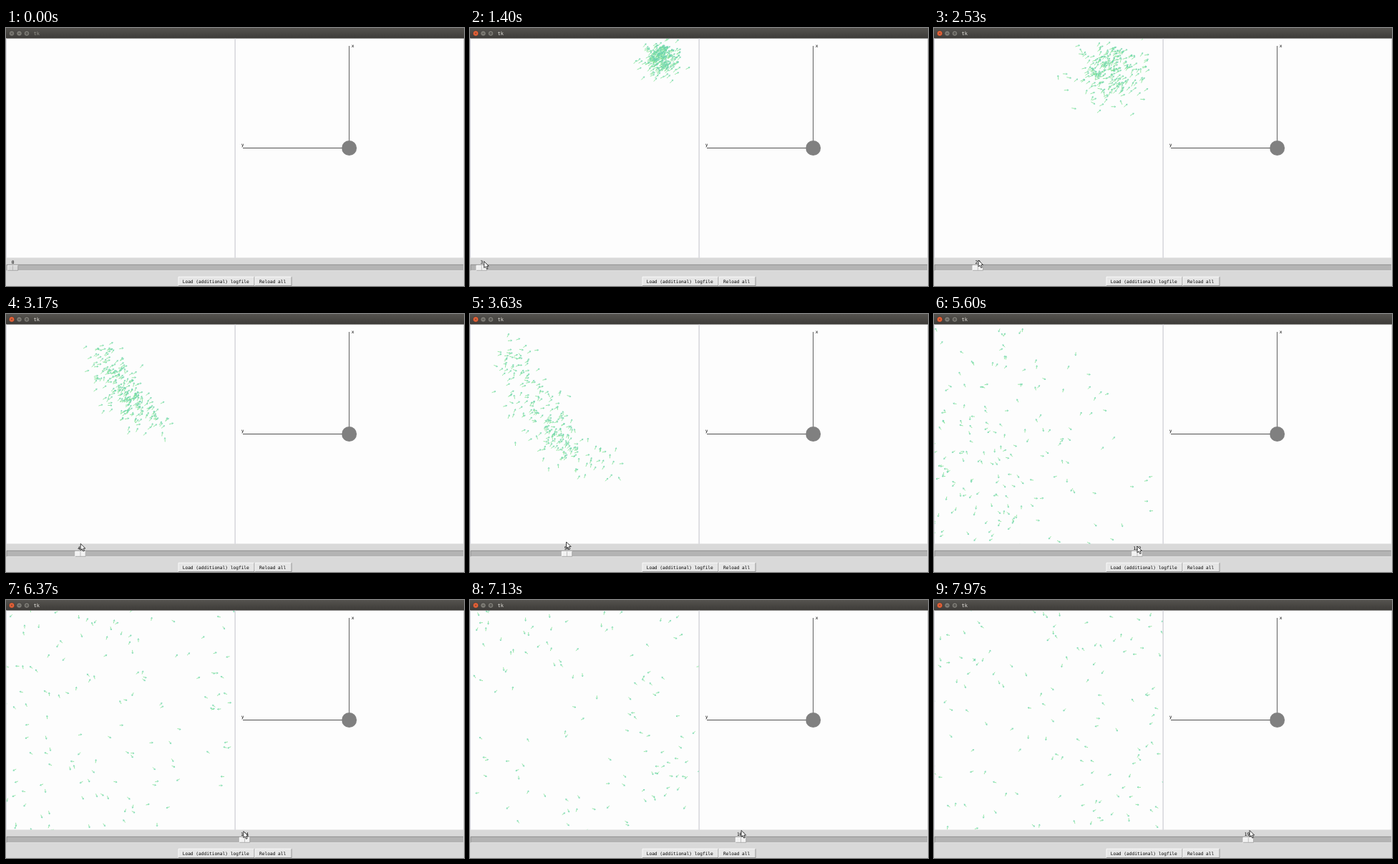
Animation of 640x360 px, one loop 8 s. Source, as an HTML page:

```html
<!DOCTYPE html>
<html lang="en">
<head>
<meta charset="utf-8">
<title>tk</title>
<style>
html, body { margin: 0; width: 100%; height: 100%; overflow: hidden; background: #d9d9d9; }
svg { display: block; width: 640px; height: 360px; }
text { font: 6.2px "DejaVu Sans Mono", monospace; fill: #000; }
</style>
</head>
<body>
<svg viewBox="0 0 640 360">
  <defs>
    <linearGradient id="bar" x2="0" y2="1">
      <stop offset="0" stop-color="#55534f"/>
      <stop offset="1" stop-color="#3d3b38"/>
    </linearGradient>
    <clipPath id="view"><rect x="1" y="15" width="318.5" height="305.5"/></clipPath>
  </defs>
  <rect width="640" height="360" fill="#d9d9d9"/>
  <rect width="640" height="14.5" fill="url(#bar)"/>
  <g fill="#7b7973" stroke="#33322f" stroke-width=".6">
    <circle id="close" cx="8" cy="7.5" r="3.8"/>
    <circle cx="18.5" cy="7.5" r="3.8"/>
    <circle cx="29" cy="7.5" r="3.8"/>
    <path d="M6.8 6.3l2.4 2.4m0-2.4l-2.4 2.4M17.3 7.5h2.4M28 6.5h2v2h-2z" fill="none"/>
  </g>
  <text id="title" x="38.5" y="10" style="font-size:7px">tk</text>

  <rect x="1" y="15" width="318.5" height="305.5" fill="#fdfdfd"/>
  <rect x="321" y="15" width="318" height="305.5" fill="#fdfdfd"/>
  <path d="M320.2 14.5V321M.5 14.5V321" stroke="#dadae2" fill="none"/>
  <g clip-path="url(#view)" fill="none">
    <path id="shafts" stroke="#74e08a" stroke-width=".75"/>
    <path id="heads" stroke="#6fd3b4" stroke-width=".7"/>
  </g>

  <path d="M479.5 25V158" stroke="#606060"/>
  <path d="M331 167.5H470" stroke="#505050"/>
  <circle cx="479.6" cy="167.5" r="10.5" fill="#808080"/>
  <text x="482.8" y="27">x</text>
  <text x="328.8" y="165">y</text>

  <rect x="1" y="330" width="638" height="8.5" fill="#b3b3b3"/>
  <path d="M1 338.5V330.3H639" stroke="#828282" stroke-width=".7" fill="none"/>
  <path d="M1 338.7H639" stroke="#f0f0f0" stroke-width=".6"/>
  <g id="thumb">
    <rect id="knob" y="331" width="15" height="7.5"/>
    <path d="M.3 338.3V331.3H15" stroke="#fff" stroke-width=".7" fill="none"/>
    <path d="M.3 338.3H14.7V331.3" stroke="#828282" stroke-width=".6" fill="none"/>
    <path d="M7.5 331.6V338" stroke="#a8a8a8" stroke-width=".7"/>
  </g>
  <text id="value" y="328.5" text-anchor="middle">0</text>

  <g id="buttons"></g>
  <text x="246.7" y="355.8">Load (additional) logfile</text>
  <text x="354" y="355.8">Reload all</text>
  <path id="cursor" d="M0 0V9L2.1 7.2 3.7 10.6 5.3 9.9 3.8 6.6H6.6Z" fill="#fff" stroke="#222" stroke-width=".9"/>
</svg>
<script>
const LOOP = 8000, FOCUS = 100, PRESS = 970, COUNT = 240, SCATTER = 89;
const $ = id => document.getElementById(id);
const mix = (a, b, k) => a + (b - a) * k;

// Linear interpolation through rows of [position, value, value, ...].
function along(rows, p) {
  if (p <= rows[0][0]) return rows[0].slice(1);
  for (let i = 1; i < rows.length; i++) {
    const a = rows[i - 1], b = rows[i];
    if (p <= b[0]) {
      const k = (p - a[0]) / (b[0] - a[0]);
      return a.slice(1).map((v, j) => mix(v, b[j + 1], k));
    }
  }
  return rows[rows.length - 1].slice(1);
}

const drag = [[1130, 0], [1970, 10], [2530, 23], [3630, 56], [4530, 89], [5600, 122],
  [6100, 137], [6930, 160], [7130, 164.5], [7770, 186], [7970, 191.4], [8000, 192.3]];
const pointer = [[300, 60, 364], [PRESS, 9.5, 326], [1130, 9.5, 326], [2530, 62, 324],
  [3630, 134.5, 318], [4530, 209, 319], [5600, 284, 324], [7130, 379, 321.5],
  [7970, 441, 321.5], [8000, 443, 321.5]];
const band = [[0, 62, 10], [.25, 66, 75], [.5, 100, 150], [.75, 150, 203], [1, 270, 240]];

// Seeded mulberry32 generator
let seed = 7;
function rnd() {
  seed = (seed + 0x6D2B79F5) | 0;
  let t = Math.imul(seed ^ (seed >>> 15), 1 | seed);
  t = (t + Math.imul(t ^ (t >>> 7), 61 | t)) ^ t;
  return ((t ^ (t >>> 14)) >>> 0) / 4294967296;
}
const gauss = () => Math.sqrt(-2 * Math.log(1 - rnd())) * Math.cos(2 * Math.PI * rnd());

function makeParticle() {
  const u = mix(rnd(), (rnd() + rnd()) / 2, .4);
  const [bx, by] = along(band, u);
  const gx = gauss(), gy = gauss();
  return {
    path: [
      [0, 270 + gx * 10, 40 + gy * 10, -.7 + gauss() * .2],
      [23, 247 + gx * 24, 60 + gy * 22, -.65 + gauss() * .45],
      [56, bx + gauss() * 17, by + gauss() * 16, mix(-.1, -1.3, u) + gauss() * .5],
      [SCATTER, bx * 1.1 - 15 + gauss() * 52, by * .9 + 68 + gauss() * 52, rnd() * 2 * Math.PI]
    ],
    speed: 2 + rnd() * 1.6,
    turn: (rnd() < .5 ? -1 : 1) * (.004 + rnd() * .014)
  };
}
const swarm = Array.from({ length: COUNT }, makeParticle);

const wrap = (p, lo, size) => lo + (((p - lo) % size) + size) % size;

// After scattering, each particle follows its own circular arc.
function pose(p, v) {
  let [x, y, a] = along(p.path, v);
  if (v > SCATTER) {
    const b = a + p.turn * (v - SCATTER), r = p.speed / p.turn;
    x = wrap(x + r * (Math.sin(b) - Math.sin(a)), -40, 400);
    y = wrap(y - r * (Math.cos(b) - Math.cos(a)), -27, 390);
    a = b;
  }
  return [x, y, a];
}

function arrow([x, y, a], len) {
  const c = Math.cos(a), s = Math.sin(a), h = len / 2;
  const at = (f, n) => (x + c * f - s * n).toFixed(1) + " " + (y + s * f + c * n).toFixed(1);
  return {
    shaft: `M${at(-h, 0)}L${at(h, 0)}`,
    head: `M${at(h - 1.8, 1.1)}L${at(h, 0)}L${at(h - 1.8, -1.1)}`
  };
}

function addButton(x, w) {
  $("buttons").innerHTML += `<rect x="${x}" y="347.3" width="${w}" height="12.4" fill="#e6e6e6"/>
    <path d="M${x} 359.7V347.3h${w}" stroke="#fff" stroke-width=".8" fill="none"/>
    <path d="M${x} 359.6h${w}V347.3" stroke="#828282" stroke-width=".8" fill="none"/>`;
}
addButton(241, 106);
addButton(348, 51);

function draw(t) {
  const active = t >= FOCUS;
  $("close").setAttribute("fill", active ? "#ec6337" : "#7b7973");
  $("title").style.fill = active ? "#e8e6e0" : "#96948c";

  const v = Math.floor(along(drag, t)[0] + .01), x = 2 + v * 2.25;
  $("thumb").setAttribute("transform", `translate(${x})`);
  $("knob").setAttribute("fill", t >= PRESS ? "#f2f2f2" : "#d9d9d9");
  $("value").setAttribute("x", x + 7.5);
  $("value").textContent = v;

  const [len] = along([[23, 6.2], [SCATTER, 4.8]], v);
  const arrows = v ? swarm.map(p => arrow(pose(p, v), len)) : [];
  $("shafts").setAttribute("d", arrows.map(a => a.shaft).join(""));
  $("heads").setAttribute("d", arrows.map(a => a.head).join(""));

  const [cx, cy] = along(pointer, t);
  $("cursor").setAttribute("transform", `translate(${cx} ${cy})`);
}

const start = performance.now();
function tick() {
  draw((performance.now() - start) % LOOP);
  requestAnimationFrame(tick);
}
tick();
</script>
</body>
</html>
```
